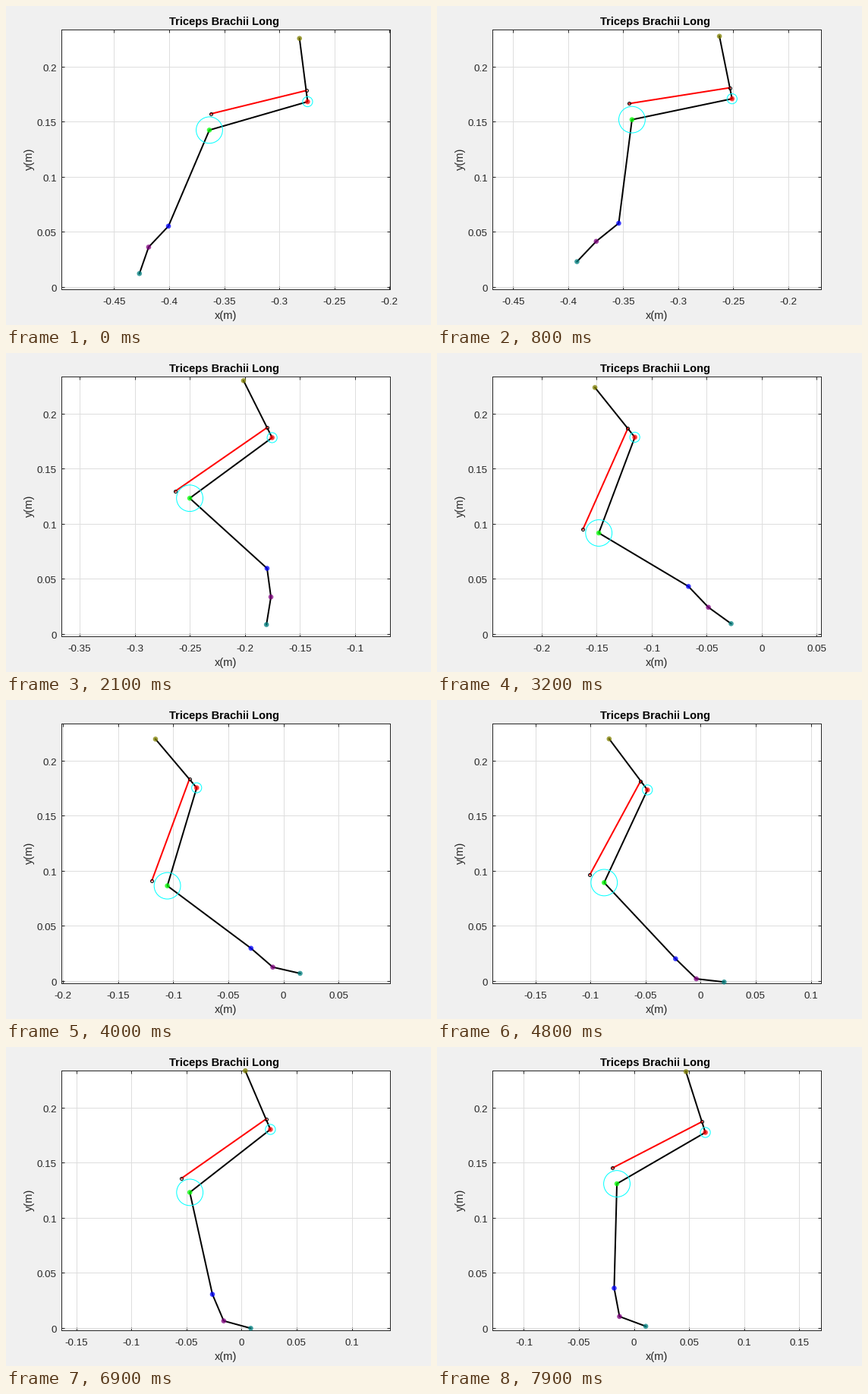
Write a matplotlib script that moves like this. It is 560x420 px and loops after 8000 ms.

```python
import numpy as np
import matplotlib.pyplot as plt
from matplotlib.animation import FuncAnimation
from matplotlib.patches import Circle
from matplotlib.ticker import FuncFormatter, MultipleLocator
from matplotlib.transforms import ScaledTranslation

W, H = 560, 420
PT = 0.72             # points per pixel at 100 dpi
SCALE = 1451          # pixels per metre
GROUND = 370          # pixel row of y = 0
LEFT, RIGHT, TOP, BOTTOM = 73, 506, 31, 373
INK = "#262626"

STEPS = 75            # moves in one loop
HOLD = 4              # extra frames the first pose stays
SCAPULA, UPPER, FOREARM, HAND, FINGERS = 84, 134.7, 137.5, 38, 36.9
BIG, SMALL = 17.4, 6.6


def wave(u, start, end, *amps):
    """Steady drift from start to end plus a short sine series."""
    swing = sum(a * np.sin(n * np.pi * u) for n, a in enumerate(amps, 1))
    return start + (end - start) * u + swing


def polar(r, deg):
    a = np.radians(deg)
    return r * np.array([np.cos(a), np.sin(a)])


def metres(points):
    p = np.asarray(points)
    return np.column_stack([p[:, 0], GROUND - p[:, 1]]) / SCALE


def limb(k):
    """Joint and muscle points; angles turn clockwise from +x."""
    u = k / STEPS
    shoulder = np.array([wave(u, -398, 94, 43, 7.4, -3.5, -0.9),
                         wave(u, 126, 112.5, -6.9, -4.2, -4.1, 2.2)])
    # the limb swings forward fast and pushes back slowly
    v = np.log1p(k / 20) / np.log1p(STEPS / 20)
    scapula = wave(v, -97.3, -107.7, -21.4, 7.3, 1.2, -1.2)
    upper = wave(v, 163.9, 149.9, -29.6, 21.6, 6.6, -3.8)
    fore = wave(v, 113.1, 91.5, -65.8, 6.6, 5.0, 1.5)
    hand = wave(v, 133.4, 79.3, -40.8, 26.6, 9.8, 2.2)
    fingers = wave(v, 109.2, 20.4, 1.3, 43.0, 8.4, -2.1)

    top = shoulder + polar(SCAPULA, scapula)
    elbow = shoulder + polar(UPPER, upper)
    wrist = elbow + polar(FOREARM, fore)
    knuckle = wrist + polar(HAND, hand)
    tip = knuckle + polar(FINGERS, fingers)
    muscle = [shoulder + polar(14.8, scapula), elbow + polar(21.5, fore - 197.6)]
    return metres([top, shoulder, elbow, wrist, knuckle, tip]), metres(muscle)


plt.rcParams["font.family"] = "Liberation Sans"
fig = plt.figure(figsize=(5.6, 4.2), dpi=100, facecolor="#f0f0f0")
ax = fig.add_axes([LEFT / W, 1 - BOTTOM / H,
                   (RIGHT - LEFT) / W, (BOTTOM - TOP) / H])
ax.set_ylim((GROUND - BOTTOM) / SCALE, (GROUND - TOP) / SCALE)
ax.set_axisbelow(True)
ax.grid(True, color="#dedede", lw=PT)
for axis in (ax.xaxis, ax.yaxis):
    axis.set_major_locator(MultipleLocator(0.05))
    axis.set_major_formatter(FuncFormatter(lambda v, _: f"{round(v, 2) + 0.0:g}"))
ax.tick_params(direction="in", top=True, right=True, length=4.3 * PT, width=PT,
               color=INK, labelcolor=INK, labelsize=13.33 * PT)
ax.tick_params(axis="x", pad=8)
ax.tick_params(axis="y", pad=4.5)
drop = ScaledTranslation(0, -1.5 / 100, fig.dpi_scale_trans)
for text in ax.get_yticklabels():
    text.set_transform(text.get_transform() + drop)
for spine in ax.spines.values():
    spine.set(color=INK, linewidth=PT)


def label(x, y, s, **kw):
    fig.text(x / W, 1 - y / H, s, ha="center", va="baseline",
             fontsize=14.67 * PT, **kw)


label(287.7, 25.2, "Triceps Brachii Long", weight="bold", color="black")
label(289.5, 412, "x(m)", color=INK)
label(34.5, 201.5, "y(m)", color=INK, rotation=90, rotation_mode="anchor")

bones, = ax.plot([], [], color="black", lw=2 * PT, zorder=3,
                 solid_joinstyle="round")
joints = ax.scatter(np.zeros(6), np.zeros(6), s=(6.6 * PT) ** 2, alpha=0.75,
                    c=["olive", "red", "lime", "blue", "purple", "teal"],
                    linewidths=0, zorder=4, clip_on=False)
tendon, = ax.plot([], [], color="red", lw=2 * PT, zorder=5, marker="o",
                  ms=4 * PT, mfc="none", mec="black", mew=PT)
rings = [Circle((0, 0), r / SCALE, fill=False, ec="cyan", lw=PT, zorder=6)
         for r in (SMALL, BIG)]
for ring in rings:
    ax.add_patch(ring)


def update(i):
    pts, muscle = limb(max(0, i - HOLD))
    joints.set_offsets(pts)
    bones.set_data(*pts.T)
    tendon.set_data(*muscle.T)
    for ring, center in zip(rings, pts[1:3]):
        ring.center = tuple(center)

    # the view stays centred on the horizontal extent of everything drawn
    xs = [*pts[:, 0], *muscle[:, 0]]
    for ring in rings:
        xs += [ring.center[0] - ring.radius, ring.center[0] + ring.radius]
    mid = (min(xs) + max(xs)) / 2 - 0.4 / SCALE
    half = (RIGHT - LEFT) / 2 / SCALE
    ax.set_xlim(mid - half, mid + half)
    return joints, bones, tendon, *rings


anim = FuncAnimation(fig, update, frames=STEPS + HOLD + 1, interval=100,
                     repeat=True, repeat_delay=0, blit=False)
plt.show()
```
